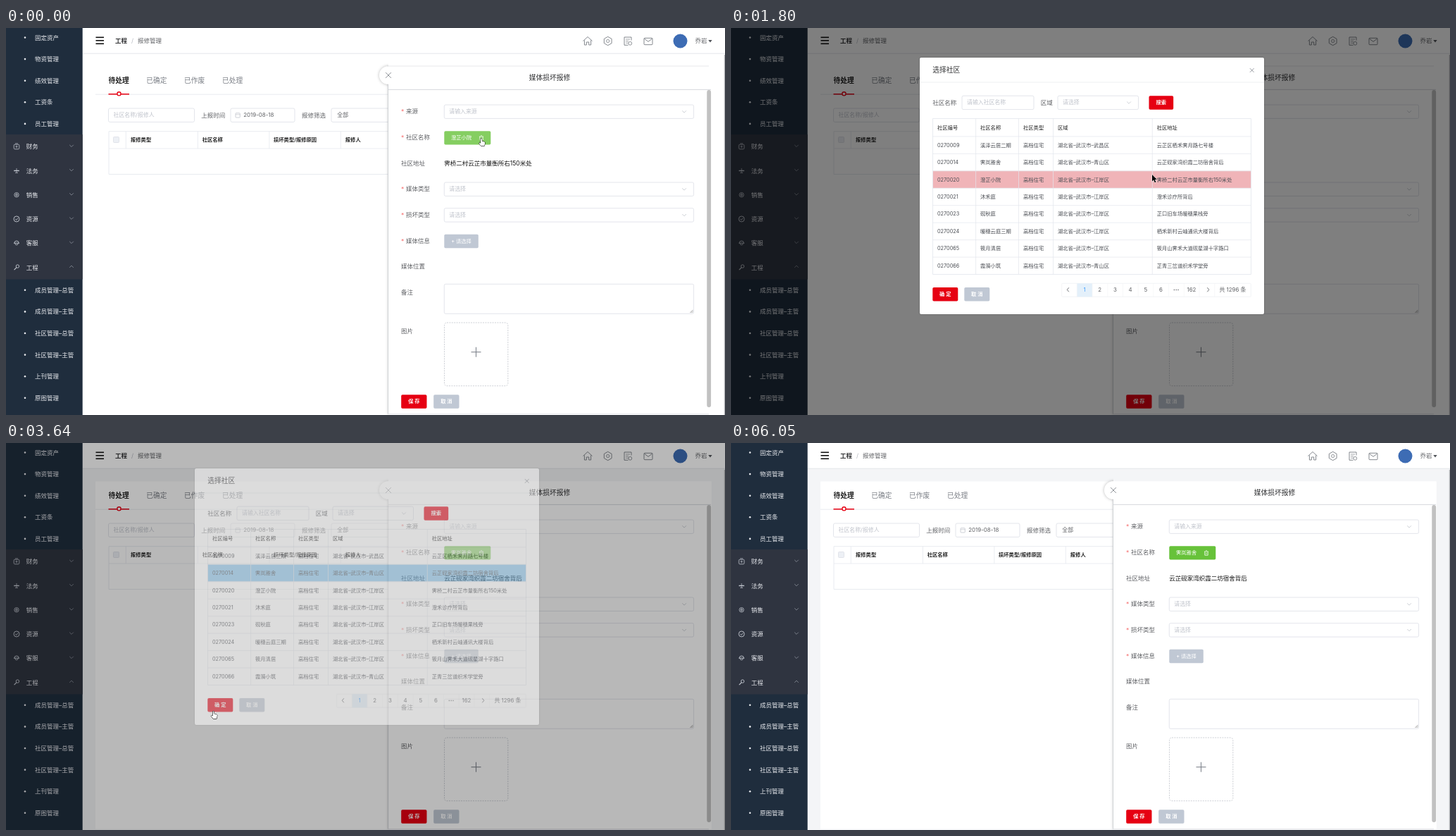
An HTML page with a canvas that plays this animation: 1021 by 549 pixels, repeating every 6.83 s.

```html
<!DOCTYPE html>
<html lang="zh-CN">
<head>
<meta charset="utf-8">
<title>报修管理</title>
<style>
html, body { margin: 0; width: 100%; height: 100%; overflow: hidden; background: #fff; }
canvas { display: block; width: 1021px; height: 549px; }
</style>
</head>
<body>
<canvas id="stage"></canvas>
<script>
const W = 1021, H = 549, LOOP = 6830;
const FONT = 'Inter, "Noto Sans CJK SC", "Noto Sans CJK", sans-serif';
const S = 7.3, M = 7.9, L = 8.5, XL = 9.75;
const RED = '#e60012', GREY = '#c0c8d4', LABEL = '#606266', HINT = '#c0c4cc', EDGE = '#dcdfe6';

const dpr = window.devicePixelRatio || 1;
const stage = document.getElementById('stage');
const layer = document.createElement('canvas');
for (const c of [stage, layer]) { c.width = W * dpr; c.height = H * dpr; }
const main = stage.getContext('2d'), sheet = layer.getContext('2d');
let g = main;

// Drawing helpers
function text(s, x, y, size = L, color = LABEL, weight = 400, align = 'left') {
  g.font = `${weight} ${size}px ${FONT}`;
  g.fillStyle = color;
  g.textAlign = align;
  g.textBaseline = 'middle';
  g.fillText(s, x, y);
}
function fill(x, y, w, h, color, r = 0) {
  g.fillStyle = color;
  g.beginPath();
  g.roundRect(x, y, w, h, r);
  g.fill();
}
function frame(x, y, w, h, color = EDGE, r = 2, width = 0.8) {
  g.strokeStyle = color;
  g.lineWidth = width;
  g.beginPath();
  g.roundRect(x, y, w, h, r);
  g.stroke();
}
function path(points, color, width = 0.8, close = false) {
  g.strokeStyle = color;
  g.lineWidth = width;
  g.beginPath();
  points.forEach(([x, y], i) => i ? g.lineTo(x, y) : g.moveTo(x, y));
  if (close) g.closePath();
  g.stroke();
}
const line = (x1, y1, x2, y2, color = EDGE, width = 0.7) => path([[x1, y1], [x2, y2]], color, width);
function ring(x, y, r, color, width = 0.8, from = 0, to = Math.PI * 2) {
  g.strokeStyle = color;
  g.lineWidth = width;
  g.beginPath();
  g.arc(x, y, r, from, to);
  g.stroke();
}
function disc(x, y, r, color) {
  g.fillStyle = color;
  g.beginPath();
  g.arc(x, y, r, 0, Math.PI * 2);
  g.fill();
}
function cross(x, y, r, color) {
  line(x - r, y - r, x + r, y + r, color, 0.9);
  line(x - r, y + r, x + r, y - r, color, 0.9);
}
const chevron = (x, y, d = 1, color = HINT) => path([[x - 2.8, y - 1.4 * d], [x, y + 1.4 * d], [x + 2.8, y - 1.4 * d]], color, 0.8);
function button(s, x, y, w, color, weight = 600) {
  fill(x, y, w, 19.5, color, 1.8);
  text(s, x + w / 2, y + 9.8, S, '#fff', weight, 'center');
}
function input(x, y, w, hint, arrow) {
  fill(x, y, w, 19.4, '#fff', 2);
  frame(x, y, w, 19.4);
  text(hint, x + 7, y + 9.8, M, HINT);
  if (arrow) chevron(x + w - 13.5, y + 9.7);
}

// Sidebar
const SUB_TOP = ['固定资产', '物资管理', '绩效管理', '工资条', '员工管理'];
const GROUPS = ['财务', '法务', '销售', '资源', '客服', '工程'];
const SUB_END = ['成员管理–总管', '成员管理–主管', '社区管理–总管', '社区管理–主管', '上刊管理', '原图管理'];

function groupIcon(i, x, y) {
  const c = '#c3c8d0';
  if (i === 0) { frame(x - 3.8, y - 3, 7.6, 6.6, c, 1.5); line(x - 2, y - 4.3, x + 2, y - 4.3, c); line(x, y - 1.5, x, y + 2, c); line(x - 1.6, y, x + 1.6, y, c); }
  if (i === 1) { line(x - 3.8, y, x + 3.8, y, c, 1.4); line(x, y - 3.5, x, y + 3, c); line(x - 2, y + 3, x + 2, y + 3, c); }
  if (i === 2) { ring(x, y, 3.2, c, 0.8); ring(x, y, 1.3, c, 1); }
  if (i === 3) { ring(x, y, 4, c, 0.9); path([[x - 2, y], [x, y + 1.5], [x + 2, y - 1.5]], c); }
  if (i === 4) { ring(x, y, 3.2, c, 0.9, Math.PI, 0); line(x - 4, y, x + 4, y, c, 1); ring(x, y + 0.6, 2, c, 0.8, 0, Math.PI); }
  if (i === 5) { ring(x + 1.4, y - 1.4, 2.2, c, 0.9); line(x, y + 0.2, x - 3.4, y + 3.6, c, 1.2); }
}
function subItems(list, y0) {
  list.forEach((s, i) => {
    const y = y0 + i * 30.6;
    disc(27, y - 0.5, 1.3, '#e8eaee');
    text(s, 41, y, L, '#e8eaee');
  });
}
function sidebar() {
  fill(0, 0, 108.7, H, '#1f2d3d');
  fill(0, 151, 108.7, 205.5, '#2f3440');
  subItems(SUB_TOP, 14);
  GROUPS.forEach((s, i) => {
    const y = 168.7 + i * 34.25;
    groupIcon(i, 15, y - 0.5);
    text(s, 28.7, y, L, '#e8eaee');
    chevron(93, y - 1.5, i === 5 ? -1 : 1, '#8d939d');
  });
  subItems(SUB_END, 372.3);
}

function header() {
  fill(108.7, 0, W - 108.7, 36, '#fff');
  line(108.7, 36.2, W, 36.2, '#e4e6ea', 1);
  for (const y of [13.3, 17.8, 22.3]) line(127.5, y, 139, y, '#111', 1.6);
  text('工程', 155, 18, L, '#303133', 600);
  text('/', 179.5, 18, L, '#b4b8bf', 400, 'center');
  text('报修管理', 187, 18);
  const c = '#777b82';
  path([[819.5, 18.5], [826, 12.5], [832.5, 18.5]], c, 0.9);
  path([[821.4, 17.5], [821.4, 24], [824.3, 24], [824.3, 20], [827.7, 20], [827.7, 24], [830.6, 24], [830.6, 17.5]], c, 0.9);
  const hex = [0, 1, 2, 3, 4, 5].map(k => [854.7 + 6.2 * Math.sin(k * Math.PI / 3), 18.5 - 6.2 * Math.cos(k * Math.PI / 3)]);
  path(hex, c, 0.9, true);
  ring(854.7, 18.5, 2.1, c);
  path([[888, 17.5], [888, 13], [878, 13], [878, 24.3], [883.5, 24.3]], c, 0.9);
  for (const y of [16, 18.6, 21.2]) line(880, y, y < 18 ? 886 : 884, y, c);
  ring(886.3, 21.8, 2.4, c);
  frame(906, 14.3, 12, 9.4, c, 1, 0.9);
  path([[906.3, 15], [912, 19.4], [917.7, 15]], c, 0.9);
  disc(957.5, 18.5, 10, '#3d6cb4');
  text('乔岩', 978.5, 18.5);
  g.fillStyle = '#505358';
  g.beginPath();
  g.moveTo(997.3, 17); g.lineTo(1002.7, 17); g.lineTo(1000, 20.4);
  g.fill();
}

function listCard() {
  fill(127, 54.5, 874.5, 493, '#fff');
  ['待处理', '已确定', '已作废', '已处理'].forEach((s, i) =>
    text(s, 145.5 + i * 53.8, 75, XL, i ? '#7b7f86' : '#222', i ? 400 : 600));
  line(127, 94.2, 543, 94.2, '#dfe2e8');
  line(145.5, 93.8, 175, 93.8, RED, 1.5);
  disc(160.5, 93.3, 2.8, '#fff');
  ring(160.5, 93.3, 2.6, RED, 1.4);
  input(145.5, 114, 122, '社区名称/报修人');
  text('上报时间', 277.3, 124);
  input(319, 114, 91, '');
  frame(326, 120.7, 6.3, 6.3, HINT, 0.8);
  line(326, 122.8, 332.3, 122.8, HINT);
  text('2019-08-18', 337.3, 124, M);
  text('报修筛选', 420, 124);
  input(462, 114, 100, '');
  text('全部', 470.3, 124, M);
  frame(146, 146.7, 500, 60.8, '#e3e6ed', 0);
  line(146, 171, 560, 171, '#e3e6ed');
  for (const x of [170.3, 272.4, 373.9, 475.3]) line(x, 146.7, x, 171, '#e3e6ed');
  fill(152.5, 154.5, 8, 8, '#edf0f5', 1);
  frame(152.5, 154.5, 8, 8, EDGE, 1);
  [['报修类型', 177], ['社区名称', 278.7], ['损坏类型/报修原因', 380], ['报修人', 481.8]]
    .forEach(([s, x]) => text(s, x, 159, S, '#222', 600));
}

// Repair form
const BEFORE = ['澄芷小院', '霁桥二村云芷市量衡所右150米处'];
const AFTER = ['霁岚雅舍', '云芷砚家湾织霞二坊宿舍背后'];
const within = (t, a, b) => t >= a && t < b;

function trash(x, y) {
  line(x - 3, y - 2, x + 3, y - 2, '#fff');
  line(x - 1, y - 3.2, x + 1, y - 3.2, '#fff');
  path([[x - 2.2, y - 2], [x - 2.2, y + 3.2], [x + 2.2, y + 3.2], [x + 2.2, y - 2]], '#fff', 0.8);
  line(x - 0.7, y - 0.3, x - 0.7, y + 1.7, '#fff', 0.5);
  line(x + 0.7, y - 0.3, x + 0.7, y + 1.7, '#fff', 0.5);
}
function community(t) {
  const picked = t < 290 ? BEFORE : t >= 3640 ? AFTER : null;
  if (picked) {
    const hover = t < 290 || within(t, 4880, 5180);
    fill(622.3, 146.2, 66, 19.4, hover ? '#85ce61' : '#67c23a', 1.8);
    text(picked[0], 632, 156, S, '#fff', 500);
    trash(675, 156);
    text(picked[1], 622.3, 192, L, '#111');
  } else {
    button('+ 添加社区', 622.3, 146.2, 55.7, within(t, 1030, 1800) ? '#a3a6ab' : '#909399', 500);
    text('请选择所属社区', 622.3, 173.7, S, '#f56c6c');
  }
}
function drawer(t, tinted) {
  g.save();
  g.shadowColor = 'rgba(0,0,0,.28)';
  g.shadowBlur = 4 * dpr;
  g.beginPath();
  g.rect(515, 40, 28, 509);
  g.clip();
  disc(543, 67, 13, '#fff');
  fill(543, 54.5, 458, 493, '#fff');
  g.restore();
  fill(543, 54.5, 458.5, 493, '#fff');
  disc(543, 67, 12.6, '#fff');
  line(542.6, 80, 542.6, 547.5, '#cfd2d7', 0.9);
  if (!tinted) line(541, 54, 998, 54, '#dddfe3');
  line(543, 547.7, 998, 547.7, '#d5d7db');
  cross(543, 67, 3.9, '#85898f');
  text('媒体损坏报修', 772, 71, XL, '#303133', 400, 'center');
  line(543, 87.4, 1001, 87.4, '#d2d5da', 0.9);
  fill(995.3, 88, 5.8, 450, within(t, 5910, 6050) ? '#9c9c9c' : '#c1c1c1', 2.9);

  [['来源', 118.7], ['社区名称', 155.5], ['媒体类型', 228.7], ['损坏类型', 265.5], ['媒体信息', 302.2]].forEach(([s, y]) => {
    text('*', 561, y + 1, L, '#f56c6c');
    text(s, 568, y);
  });
  [['社区地址', 192], ['媒体位置', 338.8], ['备注', 375.7], ['图片', 430]].forEach(([s, y]) => text(s, 561, y));
  input(622.3, 109, 354.3, '请输入来源', true);
  input(622.3, 219, 354.3, '请选择', true);
  input(622.3, 255.7, 354.3, '请选择', true);
  community(t);
  button('+ 请选择', 622.3, 292.7, 48.5, GREY, 500);
  frame(622.3, 363.3, 354.3, 42);
  line(971.5, 404, 975.5, 400, '#777', 0.7);
  line(973.6, 404, 975.5, 402.1, '#777', 0.7);
  g.setLineDash([2, 1.4]);
  frame(622.5, 418, 90.3, 89.7, '#c0c4cc', 3.5);
  g.setLineDash([]);
  line(660.5, 459.7, 674.5, 459.7, '#80858d', 1.1);
  line(667.5, 452.7, 667.5, 466.7, '#80858d', 1.1);
  button('保 存', 561.2, 520.3, 36.3, RED);
  button('取 消', 607.2, 520.3, 36.3, GREY);
}

// Picker dialog
const ROWS = [
  ['0270009', '溪泽云居二期', '武昌', '云芷区栖禾霁月路七号楼'],
  ['0270014', AFTER[0], '青山', AFTER[1]],
  ['0270020', BEFORE[0], '江岸', BEFORE[1]],
  ['0270021', '沐禾庭', '江岸', '澄禾诊疗所背后'],
  ['0270023', '砚秋庭', '江岸', '芷口旧车场暖穗果栈旁'],
  ['0270024', '暖穗云庭三期', '江岸', '栖禾新村云岫通讯大楼背后'],
  ['0270065', '筱月清居', '江岸', '筱月山霁禾大道砚星湖十字路口'],
  ['0270066', '霞漪小筑', '青山', '芷青三岔道织禾学堂旁']
];
const COLS = [293, 354, 415, 464, 604.7];
const ROW_H = 24.45, ROW_Y = 153.9;

function rowColor(i, t, cursor) {
  if (i === 2 && t < 1800) return '#8cc8f0';
  if (i === 1 && t >= 2600) return '#8cc8f0';
  if (i === 2 && within(t, 2150, 2300)) return '#f8dadd';
  return Math.floor((cursor[2] - ROW_Y) / ROW_H) === i ? '#f0b4b8' : '#fff';
}
function pager() {
  frame(469.7, 362.3, 268.6, 19, '#f0f1f4', 1);
  fill(491.2, 362.3, 21.7, 19, '#e4f0fa');
  for (let i = 1; i < 11; i++) line(469.7 + i * 21.7, 362.3, 469.7 + i * 21.7, 381.3, '#f2f3f5', 0.6);
  path([[479.8, 368.3], [477.3, 371.3], [479.8, 374.3]], '#606266', 0.9);
  path([[676.3, 368.3], [678.8, 371.3], [676.3, 374.3]], '#606266', 0.9);
  ['1', '2', '3', '4', '5', '6', '', '162'].forEach((s, i) =>
    text(s, 502 + i * 21.7, 372, M, i ? LABEL : '#409eff', 400, 'center'));
  for (const x of [629.4, 632.2, 635]) disc(x, 371.5, 0.75, LABEL);
  text('共 1296 条', 712.5, 372, M, LABEL, 400, 'center');
}
function dialog(t, cursor) {
  g.save();
  g.shadowColor = 'rgba(0,0,0,.3)';
  g.shadowBlur = 2 * dpr;
  fill(268, 42, 489, 364, '#fff', 2);
  g.restore();
  text('选择社区', 286.3, 59.7, XL, '#303133');
  cross(739.7, 60, 2.8, '#8b8f96');
  line(268, 77, 757, 77, '#e6e8ec');
  text('社区名称', 286.3, 106);
  input(328, 96.2, 102, '请输入社区名称');
  text('区域', 439.7, 106);
  input(464, 96.2, 114.5, '请选择', true);
  button('搜索', 593.5, 96.3, 34.7, RED);
  ['社区编号', '社区名称', '社区类型', '区域', '社区地址'].forEach((s, i) => text(s, COLS[i], 142, S, '#222', 500));
  ROWS.forEach(([id, name, area, place], i) => {
    const y = ROW_Y + i * ROW_H;
    fill(286.5, y, 452, ROW_H, rowColor(i, t, cursor));
    line(286.5, y, 738.5, y, '#e3e6ed');
    [id, name, '高档住宅', `湖北省–武汉市–${area}区`, place].forEach((s, k) => text(s, COLS[k], y + 12.6, S, '#4b4e54'));
  });
  frame(286.5, 128.5, 452, 221, '#e3e6ed', 0);
  for (const x of [347.6, 408.5, 457.5, 598.3]) line(x, 128.5, x, 349.5, '#e3e6ed');
  button('确 定', 286.3, 368, 36, RED);
  button('取 消', 331.3, 368, 36, GREY);
  pager();
}

// Pointer stops: time, x, y
const STOPS = [
  [0, 674, 156.5], [290, 673, 162], [440, 671, 178], [590, 667, 199], [740, 660, 192], [880, 655, 174],
  [1030, 652, 160], [1180, 650, 157], [1470, 651.5, 182], [1620, 639.3, 213.5],
  [1800, 598, 208], [1970, 528, 204], [2150, 466.3, 181.5], [2600, 466.3, 186],
  [2750, 436, 232], [2900, 376, 312], [3040, 318, 362], [3190, 293.7, 380.3], [3780, 294.3, 380],
  [3960, 310, 370], [4110, 384, 322], [4260, 470, 262], [4420, 538, 222], [4580, 567, 204],
  [4730, 604, 178], [4880, 642, 158], [5030, 656, 157], [5180, 712, 250], [5330, 808, 384],
  [5470, 900, 470], [5620, 966, 512], [5760, 992, 529], [5910, 993, 536], [6050, -50, -50]
];
const HANDS = [[0, 440], [1030, 1470], [3190, 3780], [4880, 5180]];
// Dialog stages: time, presence, veil opacity
const STAGES = [[0, 0, 0], [1620, 0.65, 0.4], [1800, 1, 0.5], [3640, 0.5, 0.28], [3780, 0.06, 0.012], [3960, 0, 0]];
const at = (list, t) => list.findLast(e => e[0] <= t);

const ARROW = [[0, 0], [0, 9.6], [2.2, 7.6], [3.8, 11.2], [5.4, 10.5], [3.9, 7], [6.9, 7]];
const HAND = [[0, 0.3], [1.5, 0.3], [1.9, 4], [5.6, 5], [6.2, 6.2], [5.4, 10.8], [0.5, 10.8], [-2.4, 7], [-1.6, 6], [0.1, 7.2]];
function pointer([, x, y], t) {
  const hand = HANDS.some(([a, b]) => within(t, a, b));
  g.save();
  g.translate(x, y);
  g.lineJoin = 'round';
  g.beginPath();
  (hand ? HAND : ARROW).forEach(p => g.lineTo(...p));
  g.closePath();
  g.fillStyle = hand ? '#fff' : '#000';
  g.strokeStyle = hand ? '#000' : '#fff';
  g.lineWidth = 1;
  g.stroke();
  g.fill();
  g.restore();
}

function draw(t) {
  const cursor = at(STOPS, t);
  const [, shown, veil] = at(STAGES, t);
  const tinted = within(t, 1620, 1800) || t >= 3640;
  g = main;
  g.setTransform(dpr, 0, 0, dpr, 0, 0);
  fill(0, 0, W, H, tinted ? '#f4f5f7' : '#fff');
  listCard();
  drawer(t, tinted);
  header();
  sidebar();
  line(1020.4, 38, 1020.4, H, '#b5b7ba', 1.2);
  if (shown) {
    fill(0, 0, W, H, `rgba(0,0,0,${veil})`);
    g = sheet;
    g.setTransform(dpr, 0, 0, dpr, 0, 0);
    g.clearRect(0, 0, W, H);
    dialog(t, cursor);
    g = main;
    g.globalAlpha = shown;
    g.drawImage(layer, 0, -12.16 * (1 - shown), W, H);
    g.globalAlpha = 1;
  }
  pointer(cursor, t);
}

const start = performance.now();
function tick() {
  draw((performance.now() - start) % LOOP);
  requestAnimationFrame(tick);
}
tick();
</script>
</body>
</html>
```
